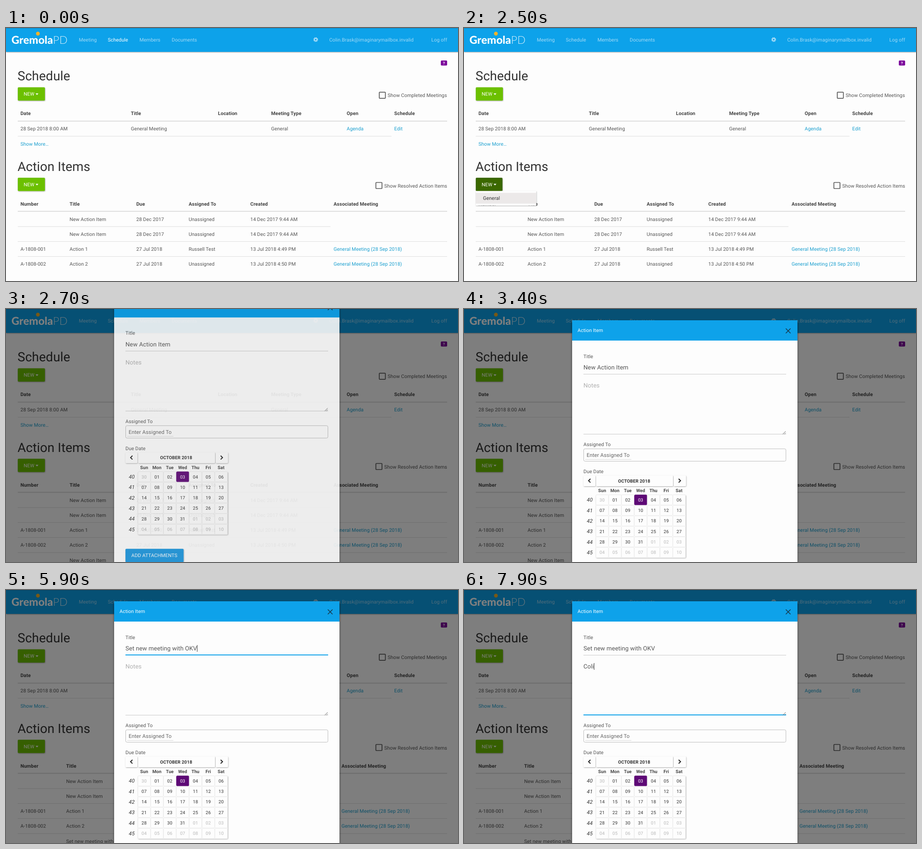
An HTML page for the animation above (8000 ms loop, 999 by 561 pixels).

```html
<!DOCTYPE html>
<html lang="en">
<head>
<meta charset="utf-8">
<title>Schedule</title>
<style>
  html, body { margin: 0; width: 100%; height: 100%; overflow: hidden; background: #fdfdfd; }
  svg { display: block; width: 999px; height: 561px; }
  text { font-family: Roboto, sans-serif; letter-spacing: .083px; white-space: pre; text-rendering: geometricPrecision; }
</style>
</head>
<body>
<svg id="stage" viewBox="0 0 999 561"></svg>
<script>
const BLUE = '#0ea2ea', GREEN = '#6cc005', LINK = '#1a9fcf', INK = '#555', PALE = '#a3daf6';
const BODY = 10.82, FIELD = 13.32;
const LOOP = 8000;
const NEW_TITLE = 'Set new meeting with OKV', NOTE = 'Coli';

// Text is placed by its left (or middle) x and the middle of its capitals.
const text = (x, cy, str, { size = BODY, fill = INK, attrs = '' } = {}) =>
  `<text x="${x}" y="${cy + size * .355}" font-size="${size}" fill="${fill}" ${attrs}>${str}</text>`;
const bold = (x, cy, str, fill = '#444') => text(x, cy, str, { fill, attrs: 'font-weight="700"' });
const rect = (x, y, w, h, fill, attrs = '') =>
  `<rect x="${x}" y="${y}" width="${w}" height="${h}" fill="${fill}" ${attrs}/>`;
const line = (x1, x2, y, color = '#ddd', width = 1) => rect(x1, y - width / 2, x2 - x1, width, color);
const path = (d, color, width, attrs = '') =>
  `<path d="${d}" fill="none" stroke="${color}" stroke-width="${width}" ${attrs}/>`;
const shadow = 'filter="url(#soft)"';

const newButton = (y, id) =>
  rect(26, y, 60, 29.5, GREEN, `id="${id}" rx="2" ${shadow}`) +
  text(39, y + 14.7, 'NEW', { fill: '#fff' }) +
  `<path d="M65.3 ${y + 13.6}h6.4l-3.2 3.3z" fill="#fff"/>`;
const checkbox = (x, cy, label) =>
  rect(x, cy - 7, 13.5, 13.5, 'none', 'rx="1" stroke="#555" stroke-width="1.7"') + text(x + 18.5, cy + .3, label);

function navbar() {
  const link = (x, str, attrs = '') => text(x, 26.5, str, { fill: PALE, attrs });
  return rect(0, 0, 999, 53, BLUE, shadow) + rect(0, 0, 999, 1, '#0d82bd') +
    '<circle cx="70.5" cy="12.5" r="4.2" fill="#f2b32a"/>' +
    '<text x="12" y="35" font-size="24" fill="#fff" style="font-family:Lato,sans-serif;font-weight:800">Gremola</text>' +
    '<text x="136" y="35" font-size="24" fill="#d5effc" text-anchor="end" style="font-family:Lato,sans-serif;font-weight:300">PD</text>' +
    link(161, 'Meeting') + link(225, 'Schedule', 'id="tab"') + link(295, 'Members') + link(366.3, 'Documents') +
    `<circle cx="684.5" cy="25.7" r="2.9" fill="none" stroke="${PALE}" stroke-width="2.4"/>
     <circle cx="684.5" cy="25.7" r="4.5" fill="none" stroke="${PALE}" stroke-width="1.6" stroke-dasharray="1.77 1.764"/>` +
    link(714.5, 'Colin.Brask@imaginarymailbox.invalid') + link(940, 'Log off');
}

function schedule() {
  const cols = [32, 276, 468.5, 586, 753, 858];
  const heads = ['Date', 'Title', 'Location', 'Meeting Type', 'Open', 'Schedule'];
  const cells = ['28 Sep 2018 8:00 AM', 'General Meeting', '', 'General', 'Agenda', 'Edit'];
  return rect(961, 72, 14, 11.3, '#7d0c9c', 'rx="2"') +
    text(968, 77.7, '?', { size: 8.5, fill: '#fff', attrs: 'font-weight="700" text-anchor="middle"' }) +
    text(25.5, 106, 'Schedule', { size: 28.33, fill: '#333' }) +
    newButton(131.5, 'newMeeting') + checkbox(825, 149.3, 'Show Completed Meetings') +
    cols.map((x, i) => bold(x, 189.5, heads[i]) + text(x, 223.5, cells[i], { fill: i > 3 ? LINK : INK })).join('') +
    line(26, 975, 206.5, '#d6d6d6', 1.7) + line(26, 852, 240) +
    text(32, 257, 'Show More…', { fill: LINK });
}

function actionItems() {
  const rowY = i => 423.7 + 33.3 * i;
  const column = (x, head, cells, fill) =>
    bold(x, 390, head) + cells.map((c, i) => text(x, rowY(i), c, { fill })).join('');
  const meeting = 'General Meeting (28 Sep 2018)';
  return text(25.5, 307.3, 'Action Items', { size: 28.33, fill: '#333' }) +
    newButton(332, 'newItem') + checkbox(817.5, 349.5, 'Show Resolved Action Items') +
    line(26, 975, 406.5, '#d6d6d6', 1.7) + line(26, 717, 440.3) + line(26, 975, 473.5) + line(26, 975, 506.7) +
    column(32, 'Number', ['', '', 'A-1808-001', 'A-1808-002']) +
    `<g id="titles">${column(140.5, 'Title', ['New Action Item', 'New Action Item', 'Action 1', 'Action 2'])}</g>` +
    column(288, 'Due', ['28 Dec 2017', '28 Dec 2017', '27 Jul 2018', '27 Jul 2018']) +
    column(403.7, 'Assigned To', ['Unassigned', 'Unassigned', 'Russell Test', 'Unassigned']) +
    column(540, 'Created', ['14 Dec 2017 9:44 AM', '14 Dec 2017 9:44 AM', '13 Jul 2018 4:49 PM', '13 Jul 2018 4:50 PM']) +
    `<g id="linked">${column(724, 'Associated Meeting', ['', '', meeting, meeting], LINK)}</g>` +
    `<g id="addedRow">${line(26, 975, 540)}${text(140.5, rowY(4), '', { attrs: 'id="addedTitle"' })}</g>`;
}

const menu = () => `<g id="menu">${rect(26, 361.5, 133.5, 32, '#fdfdfd', shadow)}` +
  `${rect(26, 365.5, 133.5, 24, '#ece9e9', 'id="hover"')}${text(42, 377.3, 'General', { fill: '#333' })}</g>`;

function calendar() {
  const small = (x, cy, str, fill, attrs = '') => text(x, cy, str, { size: 10, fill, attrs: 'text-anchor="middle" ' + attrs });
  const colX = c => 305.3 + 28.35 * c, rowY = r => 423.3 + 23.3 * r;
  let out = [[264, 26.5], [292, 170], [463.5, 27]].map(([x, w]) => rect(x, 369, w, 24, '#fdfdfd', `rx="2" ${shadow}`)).join('') +
    path('M279.5 376.5l-4.2 4.2 4.2 4.2M474.4 376.5l4.2 4.2-4.2 4.2', '#222', 2) +
    small(376, 381, 'OCTOBER 2018', '#333', 'font-weight="700"') +
    rect(291.5, 412, 198.5, 139.5, '#fdfdfd', `rx="2" ${shadow}`);
  ['Sun', 'Mon', 'Tue', 'Wed', 'Thu', 'Fri', 'Sat'].forEach((day, c) => out += small(colX(c), 402.8, day, '#444', 'font-weight="700"'));
  for (let r = 0; r < 6; r++) {
    out += text(278, rowY(r), 40 + r, { size: 11.65, fill: '#333', attrs: 'text-anchor="middle" font-style="italic"' });
    for (let c = 0; c < 7; c++) {
      const n = 7 * r + c, chosen = n === 3, other = n === 0 || n > 31;
      const day = n === 0 ? 30 : n > 31 ? n - 31 : n;
      out += rect(colX(c) - 13.7, rowY(r) - 11.3, 27.6, 22.6, chosen ? '#5e0a76' : 'none', `rx="2" stroke="${chosen ? '#5e0a76' : '#e6e6e6'}" stroke-width=".7"`) +
        small(colX(c), rowY(r), String(day).padStart(2, '0'), chosen ? '#fff' : other ? '#b8b8b8' : '#333');
    }
  }
  return out;
}

function dialog() {
  return `<g id="dialog">${rect(239, 25, 498, 640, '#fdfdfd', 'filter="url(#deep)"')}${rect(239, 25, 498, 45, BLUE)}` +
    text(251, 47.5, 'Action Item', { fill: '#fff' }) +
    path('M711.3 43.3l10.4 10.4M721.7 43.3l-10.4 10.4', '#17384a', 1.6) +
    text(264, 104.7, 'Title') + text(264, 129.6, '', { size: FIELD, attrs: 'id="titleField"' }) +
    line(264, 712, 144.5, '#c8c8c8') + `<g id="titleFocus">${line(264, 712, 144, BLUE, 2)}</g>` +
    text(264, 169.6, '', { size: FIELD, attrs: 'id="noteField"' }) +
    line(264, 712, 277.5, '#c8c8c8') + `<g id="noteFocus">${line(264, 712, 277, BLUE, 2)}</g>` +
    path('M704.5 277.5l6.5-6.5M708 277.5l3-3', '#666', 1) +
    rect(0, 0, 1, 15, '#333', 'id="caret"') +
    text(264, 300, 'Assigned To') +
    rect(264.5, 310, 447, 27.5, 'none', 'rx="3" stroke="#bbb"') +
    text(271, 324, 'Enter Assigned To', { size: 11.65, fill: '#666' }) + line(268, 370, 333.5, '#d8d8d8') +
    text(264, 360, 'Due Date') + calendar() +
    rect(264, 583, 128.5, 29.5, '#1f98e0', `rx="2" ${shadow}`) +
    text(277, 597.7, 'ADD ATTACHMENTS', { fill: '#fff' }) + '</g>';
}

const stage = document.getElementById('stage');
stage.innerHTML = `<defs>
  <filter id="soft" x="-10%" y="-20%" width="120%" height="150%"><feDropShadow dx=".7" dy="1" stdDeviation=".9" flood-opacity=".35"/></filter>
  <filter id="deep" x="-5%" y="-5%" width="110%" height="110%"><feDropShadow dx="0" dy="2" stdDeviation="2.5" flood-opacity=".5"/></filter>
  </defs>` + rect(0, 0, 999, 561, '#fdfdfd') + navbar() + schedule() + actionItems() + menu() +
  rect(0, 0, 999, 561, '#000', 'id="backdrop"') + dialog();

const el = Object.fromEntries([...stage.querySelectorAll('[id]')].map(e => [e.id, e]));
const show = (e, on) => e.setAttribute('visibility', on ? 'visible' : 'hidden');
const progress = (t, from, to) => Math.min(1, Math.max(0, (t - from) / (to - from)));

function draw(t) {
  const menuOpen = t >= 2100 && t < 2510, editing = t >= 2510;
  const titleFocus = t >= 4200 && t < 6900, noteFocus = t >= 6900;

  el.tab.setAttribute('fill', t < 2100 ? '#fff' : PALE);
  show(el.menu, menuOpen);
  el.newItem.setAttribute('fill', menuOpen ? '#3b6804' : GREEN);
  el.newItem.setAttribute('width', menuOpen ? 59 : 60);
  el.hover.setAttribute('opacity', t >= 2300 ? 1 : 0);

  el.backdrop.setAttribute('opacity', .5 * progress(t, 2510, 2660));
  const slide = progress(t, 2570, 2870);
  el.dialog.setAttribute('opacity', progress(t, 2570, 2720));
  el.dialog.setAttribute('transform', `translate(0 ${-136 * (1 - slide) ** 1.7})`);

  const title = t < 4400 ? 'New Action Item'
    : NEW_TITLE.slice(0, Math.ceil(NEW_TITLE.length * progress(t, 4400, 5850)));
  const note = NOTE.slice(0, Math.max(0, Math.floor((t - 7500) / 100)));
  el.titleField.textContent = title;
  el.noteField.textContent = note || 'Notes';
  el.noteField.setAttribute('fill', note ? INK : '#b0b0b0');
  show(el.titleFocus, titleFocus);
  show(el.noteFocus, noteFocus);

  // The title column widens once its text outgrows the other rows.
  const widen = t < 4400 ? 0 : progress(title.length, 15, NEW_TITLE.length);
  show(el.addedRow, editing);
  el.addedTitle.textContent = title;
  el.addedTitle.setAttribute('x', 140.5 - 7.5 * widen);
  el.titles.setAttribute('transform', `translate(${-7.5 * widen} 0)`);
  el.linked.setAttribute('transform', `translate(${17.5 * widen} 0)`);

  const resting = t >= 6400 && t < 6900;
  show(el.caret, (titleFocus || noteFocus) && !resting);
  const width = noteFocus ? (note ? el.noteField.getComputedTextLength() : 0) : el.titleField.getComputedTextLength();
  el.caret.setAttribute('x', 264 + width);
  el.caret.setAttribute('y', noteFocus ? 162 : 122);
}

const start = performance.now();
function tick() {
  draw((performance.now() - start) % LOOP);
  requestAnimationFrame(tick);
}
tick();
</script>
</body>
</html>
```
